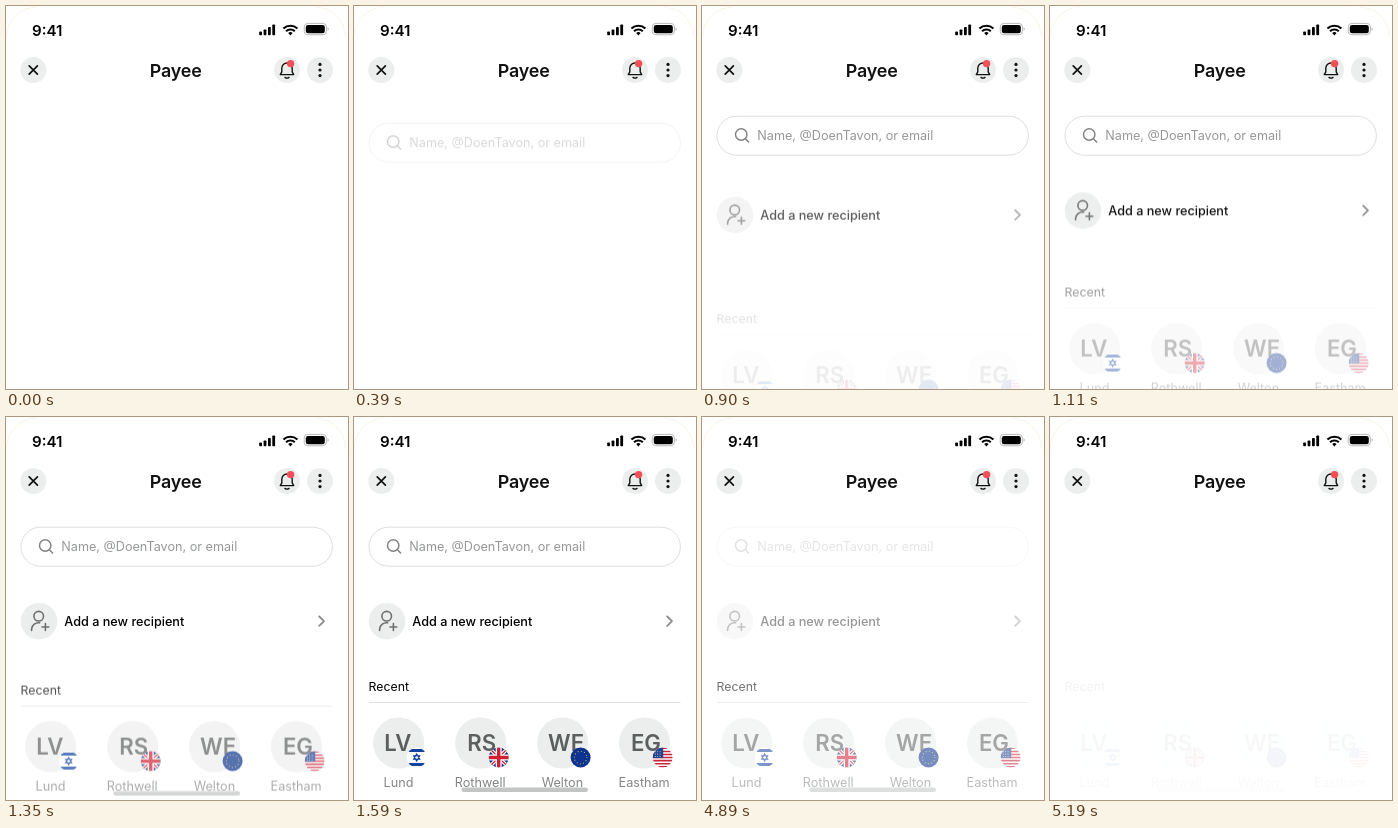
Animation, 342 px wide and 383 px high, one loop 5460 ms. Source, as an HTML page:

```html
<!DOCTYPE html>
<html lang="en">
<head>
<meta charset="utf-8">
<title>Payee</title>
<style>
  html, body { margin: 0; width: 100%; height: 100%; overflow: hidden; background: #fff; }
  svg { display: block; width: 342px; height: 383px; }
  text { font-family: Inter, Roboto, sans-serif; font-size: 12.65px; fill: #000; }
  .line { fill: none; stroke-linecap: round; stroke-linejoin: round; }
  .disc { fill: #eceeed; }
  .ink { stroke: #111; }
  .mid { text-anchor: middle; }
  .name { fill: #838684; text-anchor: middle; }
  .initials { font-size: 22.2px; font-weight: 600; fill: #5b5f5d; text-anchor: middle; }

  /* each block slides up with an ease-out while its opacity changes linearly */
  .block { animation: 5460ms linear infinite both; }
  .search { animation-name: search-move, search-fade; }
  .add { animation-name: add-move, add-fade; }
  .recent { animation-name: recent-move, recent-fade; }

  @keyframes search-move {
    0%, 2.93% { transform: translateY(24px); animation-timing-function: cubic-bezier(.23, .54, .4, .97); }
    14.29%, 100% { transform: none; }
  }
  @keyframes search-fade {
    0%, 2.93% { opacity: 0; }
    14.29%, 83.33% { opacity: 1; }
    91.58%, 100% { opacity: 0; }
  }
  @keyframes add-move {
    0%, 7.69% { transform: translateY(59px); animation-timing-function: cubic-bezier(.23, .54, .4, .97); }
    21.25%, 100% { transform: none; }
  }
  @keyframes add-fade {
    0%, 7.69% { opacity: 0; }
    21.25%, 84.07% { opacity: 1; }
    93.41%, 100% { opacity: 0; }
  }
  @keyframes recent-move {
    0%, 14.84% { transform: translateY(59px); animation-timing-function: cubic-bezier(.23, .54, .4, .97); }
    29.12%, 100% { transform: none; }
  }
  @keyframes recent-fade {
    0%, 14.84% { opacity: 0; }
    29.12%, 84.8% { opacity: 1; }
    95.05%, 100% { opacity: .05; }
  }
</style>
</head>
<body>
<svg viewBox="0 0 342 383" xmlns="http://www.w3.org/2000/svg">
  <defs>
    <clipPath id="round"><circle r="10"/></clipPath>
    <circle id="avatar" class="disc" cy="326" r="25.6"/>
  </defs>

  <path class="line" stroke="#fdf4e4" d="M.5 31A30 30 0 0 1 30 1M309.5 1A30 30 0 0 1 339.5 31"/>

  <!-- status bar -->
  <text x="26" y="29.5" style="font-size:15.1px;font-weight:600">9:41</text>
  <g>
    <rect x="253.2" y="25.4" width="2.8" height="3.8" rx=".8"/>
    <rect x="257.6" y="23.4" width="2.8" height="5.8" rx=".8"/>
    <rect x="262" y="21" width="2.8" height="8.2" rx=".8"/>
    <rect x="266.3" y="18.5" width="2.8" height="10.7" rx=".8"/>
  </g>
  <g class="line" stroke="#000" stroke-width="2.1" style="stroke-linecap:butt">
    <path d="M277.4 22.6a10.2 10.2 0 0 1 14 0M280 25.3a6.4 6.4 0 0 1 8.8 0"/>
  </g>
  <path d="M284.4 29.4l-2.2-2.4a3.3 3.3 0 0 1 4.4 0z"/>
  <rect x="298.2" y="17.4" width="22.2" height="11.4" rx="3.6" fill="none" stroke="#b0b0b0" stroke-width=".9"/>
  <rect x="299.8" y="19" width="19" height="8.2" rx="2.2"/>
  <path d="M321.6 21.3v3.6a2 2 0 0 0 0-3.6z" fill="#b0b0b0"/>

  <!-- header -->
  <circle class="disc" cx="27.3" cy="64" r="13"/>
  <path class="line ink" stroke-width="1.7" d="M23.2 59.9l8.2 8.2M31.4 59.9l-8.2 8.2"/>
  <text class="mid" x="169.7" y="70.7" style="font-size:17.9px;font-weight:600;letter-spacing:-.2px;fill:#111">Payee</text>
  <circle class="disc" cx="281" cy="64" r="13"/>
  <path class="line ink" stroke-width="1.4" d="M274.3 68.6h13.4l-1.5-2.8v-3.6a5.2 5.2 0 0 0-10.4 0v3.6zM279 71.4q2 1.4 4 0"/>
  <circle cx="284.6" cy="57.6" r="3.7" fill="#f24f58"/>
  <circle class="disc" cx="314" cy="64" r="13"/>
  <g fill="#111">
    <circle cx="314" cy="58.4" r="1.6"/>
    <circle cx="314" cy="64" r="1.6"/>
    <circle cx="314" cy="69.6" r="1.6"/>
  </g>

  <g class="block search">
    <rect x="15" y="110.2" width="311.4" height="39" rx="19.5" fill="#fff" stroke="#dcdedd"/>
    <g class="line" stroke="#808381" stroke-width="1.5">
      <circle cx="39.2" cy="128.5" r="5.7"/>
      <path d="M43.4 132.7l3.2 3.3"/>
    </g>
    <text x="55.3" y="133.6" style="fill:#959896">Name, @DoenTavon, or email</text>
  </g>

  <g class="block add">
    <circle class="disc" cx="33" cy="204.2" r="18.3"/>
    <g class="line" stroke="#6c6f6d" stroke-width="1.6">
      <circle cx="32.7" cy="199.2" r="4.8"/>
      <path d="M25.6 213.4v-1.4a7 7 0 0 1 8-6.2M39.4 206.6v6.8M36 210h6.8"/>
    </g>
    <text x="58.3" y="208.5" style="font-weight:500">Add a new recipient</text>
    <path class="line" stroke="#8a8d8b" stroke-width="1.8" d="M313.2 199.5l4.8 4.7-4.8 4.7"/>
  </g>

  <g class="block recent">
    <text x="14.6" y="273.7" style="font-size:12.3px">Recent</text>
    <path stroke="#e0e2e1" d="M15 285.5h311.5"/>

    <g transform="translate(44.7)">
      <use href="#avatar"/>
      <text class="initials" x="-.9" y="334">LV</text>
      <g transform="translate(18 340.5)" clip-path="url(#round)">
        <rect x="-10" y="-10" width="20" height="20" fill="#fff"/>
        <path stroke="#1142a0" stroke-width="3" d="M-10-7h20M-10 7h20"/>
        <path fill="none" stroke="#1142a0" stroke-width="1.1" d="M0-3.6L3.1 1.8H-3.1zM0 3.6L3.1-1.8H-3.1z"/>
      </g>
      <text class="name" x="-.2" y="370.4">Lund</text>
    </g>

    <g transform="translate(126.7)">
      <use href="#avatar"/>
      <text class="initials" x="1.1" y="334">RS</text>
      <g transform="translate(18 340.5)" clip-path="url(#round)">
        <rect x="-10" y="-10" width="20" height="20" fill="#17337f"/>
        <path stroke="#fff" stroke-width="3.6" d="M-10-10L10 10M10-10L-10 10"/>
        <path stroke="#cf2034" stroke-width="1.3" d="M-10-10L10 10M10-10L-10 10"/>
        <path stroke="#fff" stroke-width="6" d="M0-10v20M-10 0h20"/>
        <path stroke="#cf2034" stroke-width="3.4" d="M0-10v20M-10 0h20"/>
      </g>
      <text class="name" x="-.5" y="370.4">Rothwell</text>
    </g>

    <g transform="translate(208.6)">
      <use href="#avatar"/>
      <text class="initials" x="3.5" y="334">WE</text>
      <g transform="translate(18 340.5)">
        <circle r="10" fill="#0b338f"/>
        <circle class="line" r="6.3" stroke="#c9b84a" stroke-width="1.2" stroke-dasharray="0 3.2987"/>
      </g>
      <text class="name" x="-.2" y="370.4">Welton</text>
    </g>

    <g transform="translate(290.5)">
      <use href="#avatar"/>
      <text class="initials" x="1.4" y="334">EG</text>
      <g transform="translate(18.2 340.5)" clip-path="url(#round)">
        <rect x="-10" y="-10" width="20" height="20" fill="#fff"/>
        <path stroke="#c8253b" stroke-width="1.55" d="M-10-9.2h20M-10-6.1h20M-10-3h20M-10 0h20M-10 3.1h20M-10 6.2h20M-10 9.3h20"/>
        <rect x="-10" y="-10" width="10.5" height="10.6" fill="#23438f"/>
        <path class="line" stroke="#fff" stroke-width=".8" stroke-dasharray="0 2.4" d="M-7.4-5.8h7M-7.4-3.4h7M-7.4-1h7"/>
      </g>
      <text class="name" x="-.4" y="370.4">Eastham</text>
    </g>

    <rect x="107.4" y="370.6" width="126.6" height="4.5" rx="2.25" fill="#c3c5c4"/>
  </g>
</svg>
</body>
</html>
```
